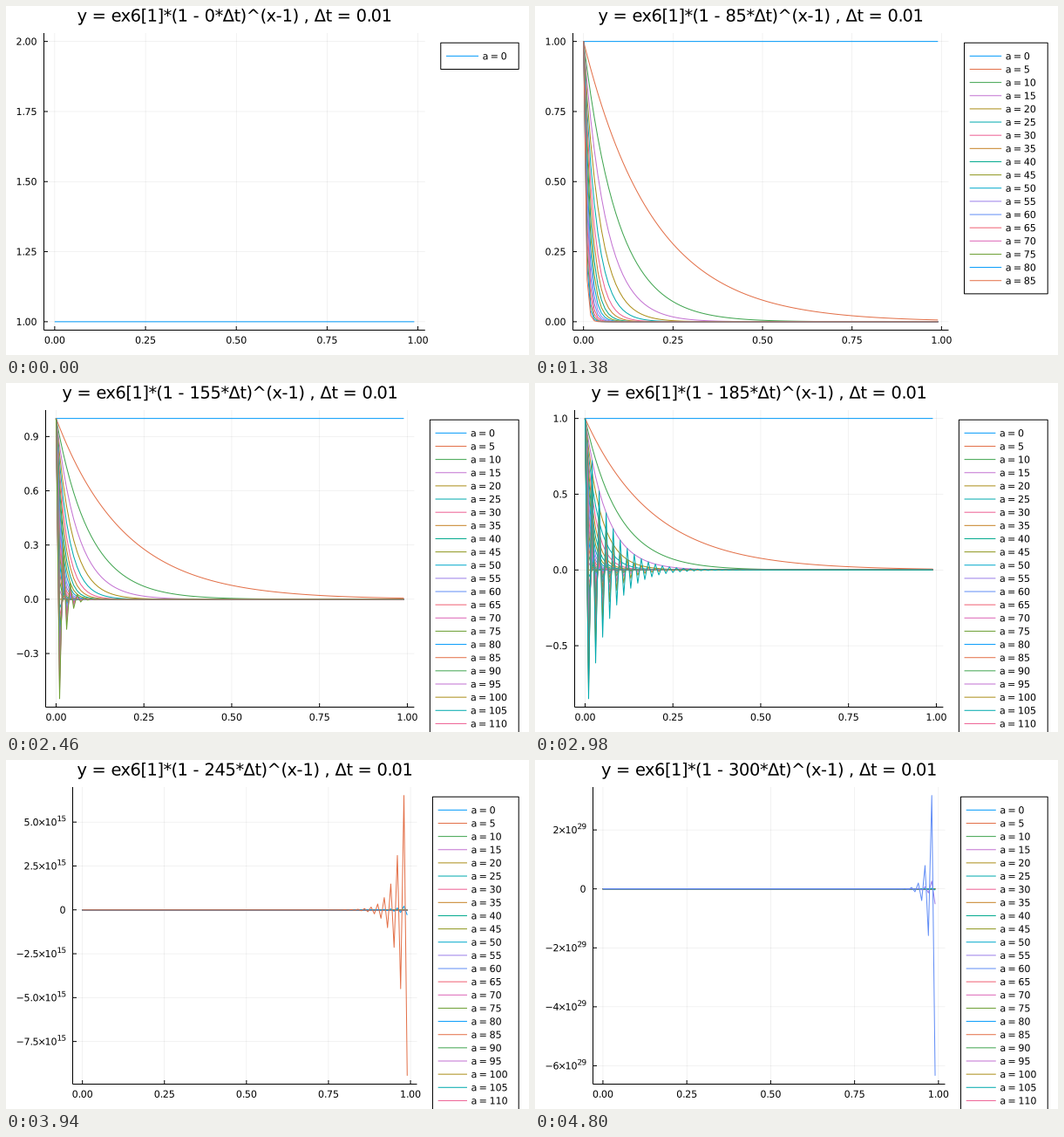
Animation, 600 px wide and 400 px high, one loop 4.9 s. Source, as a matplotlib script:

```python
import math

import matplotlib.pyplot as plt
import numpy as np
from matplotlib.animation import FuncAnimation
from matplotlib.collections import LineCollection
from matplotlib.patches import PathPatch, Rectangle
from matplotlib.path import Path
from matplotlib.textpath import TextPath

W, H, DPI = 600, 400, 100
PT = 72 / DPI                     # points per pixel
STEP_MS, LOOP_MS = 20, 4900
TITLE, SMALL = 14 / PT, 8 / PT
SUP = 0.8 * SMALL
TOP, BOTTOM = 31.0, 371.5
LEGEND_TOP, LEGEND_RIGHT, ROW = 42.2, 588.2, 15.14

PALETTE = ["#009afa", "#e36f47", "#3ea44e", "#c371d2", "#ac8e18", "#00aaae",
           "#ed5e93", "#c68225", "#00a98d", "#8e971e", "#00a9cc", "#9b7fe9",
           "#618df6", "#f06073", "#dd65b6", "#6c9f33"]
NICE = [(1, 1.0), (5, 0.9), (2.5, 0.5), (2, 0.7), (3, 0.2)]

DT = 0.01
N = np.arange(100)
X = N * DT
CURVES = [(1 - a * DT) ** N for a in range(0, 301, 5)]

plt.rcParams["font.family"] = "DejaVu Sans"
fig = plt.figure(figsize=(W / DPI, H / DPI), dpi=DPI, facecolor="white")
ax = fig.add_axes([0, 0, 1, 1])
ax.set_xlim(0, W)
ax.set_ylim(H, 0)
ax.axis("off")


# --- text: glyph outlines set with whole-pixel advances ---

glyphs = {}


def ink_right(s):
    return TextPath((0, 0), s, size=1).get_extents().x1


def glyph(c):
    """Outline and advance of a character, in em."""
    if c not in glyphs:
        advance = ink_right(f"H{c}H") - ink_right("HH")
        outline = None if c == " " else TextPath((0, 0), c, size=1)
        glyphs[c] = outline, advance
    return glyphs[c]


def advance(c, size):
    tight = 2 if c == "×" else 0
    return math.floor(glyph(c)[1] * size) - tight


def text_width(s, size=SMALL):
    return sum(advance(c, size) for c in s)


def text(x, y, s, size=SMALL, align=0.0):
    """Outlines of s on baseline y; align is 0 left, 0.5 centre, 1 right."""
    x -= align * text_width(s, size)
    paths = []
    for c in s:
        outline = glyph(c)[0]
        if outline is not None:
            start = x - 1 if c == "×" else x
            verts = outline.vertices * (size, -size) + (start, y)
            paths.append(Path(verts, outline.codes))
        x += advance(c, size)
    return paths


# --- ticks ---

def padded(lo, hi):
    pad = 0.03 * (hi - lo)
    return lo - pad, hi + pad


def nice_ticks(lo, hi):
    """Score candidate steps by count, zero, coverage and niceness."""
    span = hi - lo
    order = math.floor(math.log10(span))
    best, top_score = [], -math.inf
    for z in (order, order - 1):
        for q, nice in NICE:
            step = q * 10.0 ** z
            first, last = math.ceil(lo / step), math.floor(hi / step)
            count = last - first + 1
            if not 4 <= count <= 8:
                continue
            score = (0.25 * (1 - abs(count - 5) / 5)
                     + (first <= 0 <= last) / 6
                     + 0.5 * span / ((count - 1) * step)
                     + 0.25 * nice)
            if score > top_score + 1e-9:
                top_score = score
                best = [n * step for n in range(first, last + 1)]
    return best


def decimals(values):
    for p in range(6):
        if all(abs(round(v, p) - v) < 1e-7 * max(1, abs(v)) for v in values):
            return p
    return 6


def tick_labels(ticks):
    """Pairs of (number, exponent); the exponent is empty in plain style."""
    if abs(math.log10(ticks[-1] - ticks[0])) <= 4:
        p = decimals(ticks)
        return [(f"{v:.{p}f}".replace("-", "−"), "") for v in ticks]
    parts = []
    for v in ticks:
        e = math.floor(math.log10(abs(v)) + 1e-9) if v else 0
        parts.append((v / 10.0 ** e, e))
    p = decimals([m for m, _ in parts])
    return [(f"{m:.{p}f}×10".replace("-", "−"), str(e)) if m else ("0", "")
            for m, e in parts]


def label_width(number, exponent):
    return text_width(number) + text_width(exponent, SUP)


def label(right, y, number, exponent):
    base = y + 4
    return (text(right, base - 5, exponent, SUP, 1)
            + text(right - text_width(exponent, SUP), base, number, align=1))


# --- drawing ---

def lines(segments, color, width, zorder, alpha=None):
    group = LineCollection(segments, colors=color, linewidths=width * PT,
                           zorder=zorder, alpha=alpha)
    group.set_snap(False)
    ax.add_collection(group, autolim=False)


def draw_legend(left, plot_w, count, colors):
    """Draw box and keys, and return the outlines of the entries."""
    text_x = left + 0.0889 * plot_w + 9
    ax.add_patch(Rectangle((left, LEGEND_TOP), LEGEND_RIGHT - left,
                           (count + 1) * ROW, facecolor="white",
                           edgecolor="black", linewidth=PT, zorder=4,
                           snap=False))
    shown = min(count, 24)
    rows = [LEGEND_TOP + ROW * (i + 1) for i in range(shown)]
    lines([[(left + 6.2, y), (text_x - 4.6, y)] for y in rows],
          colors[:shown], 1, 5)
    return [p for i, y in enumerate(rows)
            for p in text(text_x, y + 4, f"a = {5 * i}")]


def draw_plot(index):
    a = 5 * index
    curves = CURVES[:index + 1]
    lo, hi = min(c.min() for c in curves), max(c.max() for c in curves)
    if lo == hi:
        hi = lo + 1
    y0, y1 = padded(lo, hi)
    x0, x1 = padded(X[0], X[-1])

    yticks = nice_ticks(y0, y1)
    xticks = nice_ticks(x0, x1)
    ylabels = tick_labels(yticks)

    # the plot area fills what tick labels and legend leave free
    left = 19.5 + max(label_width(*lab) for lab in ylabels)
    right = (557.3 - text_width(f"a = {a}") + 0.111 * left) / 1.111
    plot_w = right - left

    def px(x):
        return left + (x - x0) / (x1 - x0) * plot_w

    def py(y):
        return BOTTOM - (y - y0) / (y1 - y0) * (BOTTOM - TOP)

    xs, ys = [px(v) for v in xticks], [py(v) for v in yticks]
    lines([[(x, TOP), (x, BOTTOM)] for x in xs]
          + [[(left, y), (right, y)] for y in ys],
          "black", 0.5, 1, alpha=0.1)
    lines([[(left, TOP), (left, BOTTOM)], [(left, BOTTOM), (right, BOTTOM)]]
          + [[(x, BOTTOM), (x, BOTTOM - 4.5)] for x in xs]
          + [[(left, y), (left + 4.5, y)] for y in ys],
          "black", 1, 2)

    colors = [PALETTE[i % len(PALETTE)] for i in range(index + 1)]
    lines([np.column_stack([px(X), py(c)]) for c in curves], colors, 1, 3)

    outlines = draw_legend(right + 18, plot_w, index + 1, colors)
    outlines += text((left + right) / 2, 17.7,
                     f"y = ex6[1]*(1 - {a}*Δt)^(x-1) , Δt = {DT}", TITLE, 0.5)
    for x, (s, _) in zip(xs, tick_labels(xticks)):
        outlines += text(x, 386.8, s, align=0.5)
    for y, lab in zip(ys, ylabels):
        outlines += label(left - 8, y, *lab)
    ax.add_patch(PathPatch(Path.make_compound_path(*outlines),
                           facecolor="black", linewidth=0, zorder=6))


def index_at(ms):
    """Plots come in groups of four lasting 100, 20, 100 and 100 ms."""
    group, rest = divmod(ms, 320)
    return 4 * group + sum(rest >= t for t in (100, 120, 220))


shown_index = None


def update(frame):
    global shown_index
    index = index_at(frame * STEP_MS)
    if index != shown_index:
        for art in [*ax.collections, *ax.patches]:
            art.remove()
        draw_plot(index)
        shown_index = index
    return []


anim = FuncAnimation(fig, update, frames=LOOP_MS // STEP_MS,
                     interval=STEP_MS, repeat=True, repeat_delay=0,
                     blit=False)
plt.show()
```
